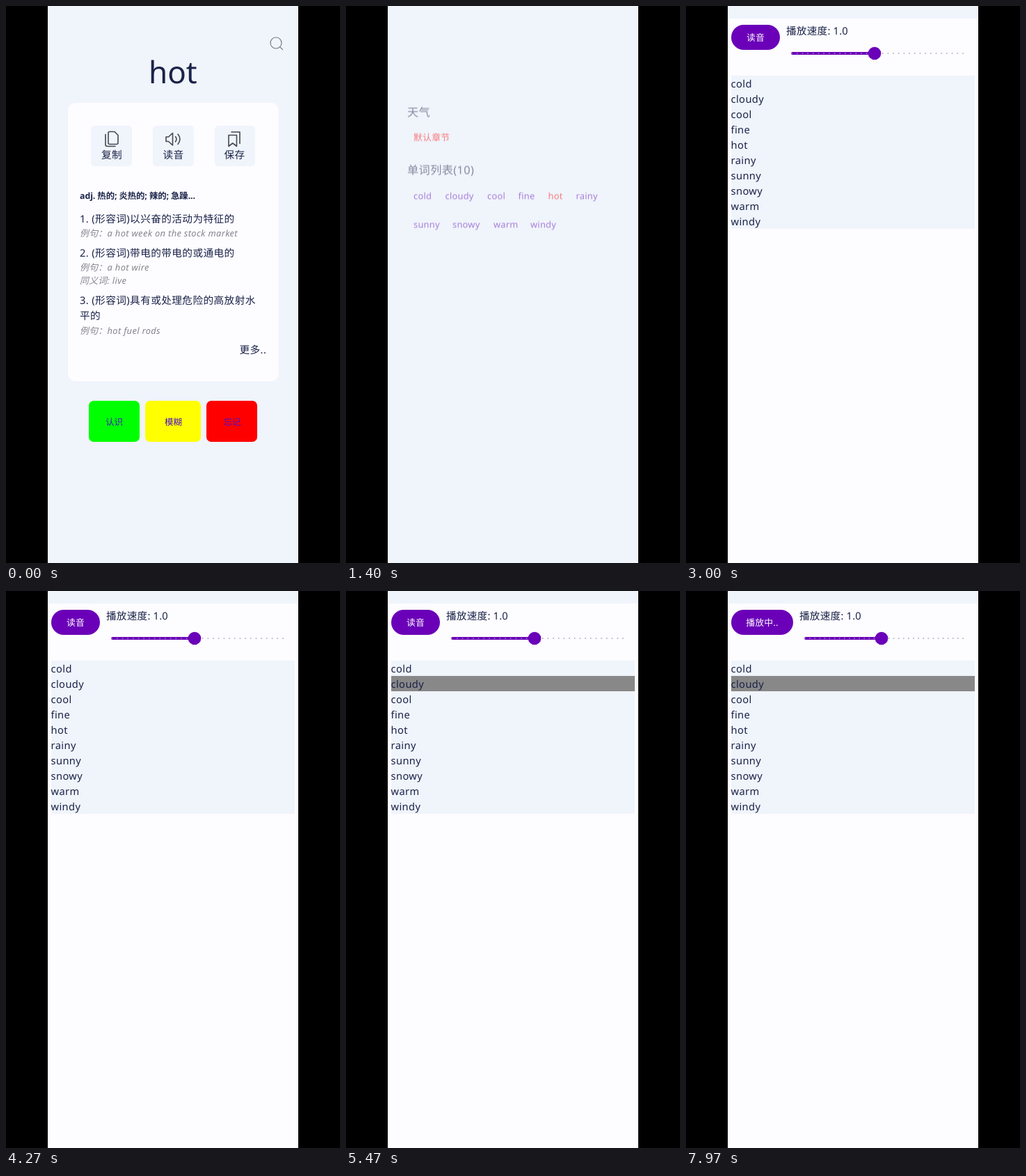
These frames come from a looping animation (480 by 800 pixels, 8000 ms). An HTML page:

```html
<!DOCTYPE html>
<html lang="zh-CN">
<head>
<meta charset="utf-8">
<title>Word cards</title>
<style>
  html, body { margin: 0; width: 100%; height: 100%; overflow: hidden; background: #000; }
  svg { display: block; width: 480px; height: 800px; }
  text {
    font: 14.67px "Noto Sans", "Noto Sans CJK SC", sans-serif;
    letter-spacing: .4px; fill: #1a2348; text-rendering: geometricPrecision;
  }
  .mid { text-anchor: middle; }
  .word { font-size: 44px; letter-spacing: 0; }
  .brief { font-size: 12.4px; font-weight: 700; letter-spacing: -.1px; }
  .note { font-size: 12.83px; font-style: italic; letter-spacing: .35px; fill: #85858c; }
  .grade { font-size: 12.5px; letter-spacing: .1px; fill: #4a10c8; text-anchor: middle; }
  .head { font-size: 16.2px; }
  .chip { font-size: 12.83px; letter-spacing: .25px; fill: #5f0ab8; }
  .red { fill: #f00; }
  .label { font-size: 12.83px; letter-spacing: .2px; fill: #fff; text-anchor: middle; }
  .speed { letter-spacing: .2px; }
  .page { fill: #f0f4fb; }
  .sheet { fill: #fdfcff; }
  .purple { fill: #6a00b8; }
  .icon { fill: none; stroke: #44484f; stroke-width: 1.6; stroke-linejoin: round; stroke-linecap: round; }
  .ticks { stroke-width: 2; stroke-linecap: round; }

  .anim { animation: 8s linear infinite; }
  .cut { animation: 8s step-end infinite; }
  #card { animation-name: card; }
  #list { animation-name: list; }
  #edge { animation-name: edge; transform-origin: 60px 413px; }
  #player { animation-name: player; }
  #row { animation-name: row; }
  #idle { animation-name: idle; }
  #busy { animation-name: busy; }
  #ripple { animation-name: ripple; }

  @keyframes card { 0%, 5% { opacity: 1; } 7%, 100% { opacity: 0; } }
  @keyframes list {
    0%, 5% { opacity: 0; transform: none; }
    7%, 10.75% { opacity: 1; transform: none; animation-timing-function: ease-in-out; }
    17.5% { opacity: .5; transform: translateY(81px); animation-timing-function: ease-out; }
    20.5%, 100% { opacity: 1; transform: none; }
  }
  @keyframes edge {
    0%, .5% { transform: scaleX(0); animation-timing-function: ease-out; }
    3.75%, 5% { transform: scaleX(4); }
    7.75% { transform: scaleX(1); }
    9.25%, 100% { transform: scaleX(0); }
  }
  @keyframes player { 0% { opacity: 0; } 31.375%, 100% { opacity: 1; } }
  @keyframes row { 0% { opacity: 0; } 57.5%, 100% { opacity: 1; } }
  @keyframes idle { 0% { opacity: 1; } 76.25%, 100% { opacity: 0; } }
  @keyframes busy { 0% { opacity: 0; } 76.25%, 100% { opacity: 1; } }
  @keyframes ripple { 0%, 76.2% { opacity: 0; } 76.25% { opacity: .18; } 81.6%, 100% { opacity: 0; } }
</style>
</head>
<body>
<svg viewBox="0 0 480 800">
  <rect width="480" height="800"/>
  <rect class="page" x="60" width="360" height="800"/>

  <g id="card" class="anim">
    <g class="icon" style="stroke:#70747c;stroke-width:1.1">
      <circle cx="388" cy="53" r="8"/><path d="M393.8 58.8 397.5 62.5"/>
    </g>
    <text class="word mid" x="239.8" y="111">hot</text>
    <rect class="sheet" x="89" y="139" width="303" height="400" rx="11"/>
    <g class="page">
      <rect x="122" y="172" width="59" height="58" rx="5"/>
      <rect x="211" y="172" width="59" height="58" rx="5"/>
      <rect x="300" y="172" width="58" height="58" rx="5"/>
    </g>
    <g class="icon">
      <path d="M149 180.500h7l5 5v11q0 2-2 2h-10q-2 0-2-2v-14q0-2 2-2ZM143 184.500v14.500q0 2.500 2.500 2.500h11.500"/>
      <path d="M230 188h3.500l6-5.500v17.500l-6-5.500h-3.500ZM243.500 187.500q3 3.700 0 7.500M247 184q6 7.200 0 14.500"/>
      <path d="M320 185.500h11.500v16l-5.700-4.500-5.800 4.500ZM324 181h12v16.500"/>
    </g>
    <text class="mid" x="152" y="218.500">复制</text>
    <text class="mid" x="240.500" y="218.500">读音</text>
    <text class="mid" x="328.500" y="218.500">保存</text>

    <text class="brief" x="106" y="277">adj. 热的; 炎热的; 辣的; 急躁...</text>
    <text x="106" y="311">1. (形容词)以兴奋的活动为特征的</text>
    <text class="note" x="106" y="331">例句：a hot week on the stock market</text>
    <text x="106" y="360">2. (形容词)带电的带电的或通电的</text>
    <text class="note" x="106" y="380">例句：a hot wire</text>
    <text class="note" x="106" y="399">同义词: live</text>
    <text x="106" y="428">3. (形容词)具有或处理危险的高放射水</text>
    <text x="106" y="450">平的</text>
    <text class="note" x="106" y="471">例句：hot fuel rods</text>
    <text x="335.500" y="499">更多..</text>

    <rect x="119" y="567" width="73" height="59" rx="7" fill="#0f0"/>
    <rect x="200" y="567" width="80" height="59" rx="7" fill="#ff0"/>
    <rect x="288" y="567" width="73" height="59" rx="7" fill="#f00"/>
    <text class="grade" x="155.500" y="601.500">认识</text>
    <text class="grade" x="240.500" y="601.500">模糊</text>
    <text class="grade" x="325" y="601.500">忘记</text>
  </g>

  <g id="list" class="anim">
    <text class="head" x="88" y="78">天气</text>
    <text class="chip red" x="97" y="113">默认章节</text>
    <text class="head" x="88" y="161">单词列表(10)</text>
    <g id="chips"></g>
  </g>

  <path id="edge" class="anim" d="M60 312C60 350 66 375 66 413S60 476 60 514Z" fill="#000" fill-opacity=".78"/>

  <g id="player" class="cut">
    <rect class="sheet" x="60" width="360" height="800"/>
    <rect class="page" x="60" width="360" height="18"/>
    <rect class="page" x="65" y="100" width="350" height="220"/>
    <rect id="row" class="cut" x="65" y="122" width="350" height="22" fill="#888"/>
    <g id="rows"></g>
    <g id="idle" class="cut"></g>
    <g id="busy" class="cut"></g>
    <rect id="ripple" class="anim" x="65" y="27" width="89" height="36" rx="18" fill="#fff"/>
  </g>
</svg>
<script>
  const $ = id => document.getElementById(id);
  const words = ['cold', 'cloudy', 'cool', 'fine', 'hot', 'rainy', 'sunny', 'snowy', 'warm', 'windy'];
  const chipX = [97, 142.5, 203, 247.5, 290.5, 330.5, 97, 153, 212, 265];

  $('chips').innerHTML = words.map((w, i) =>
    `<text class="chip ${w === 'hot' ? 'red' : ''}" x="${chipX[i]}" y="${i < 6 ? 196.5 : 237.5}">${w}</text>`).join('');
  $('rows').innerHTML = words.map((w, i) => `<text x="64.5" y="${117 + 22 * i}">${w}</text>`).join('');

  // Play button, speed caption and slider; the slider shrinks as the button widens.
  function controls(label, width, thumb) {
    const left = 82 + width, right = 398, gap = (right - left) / 32;
    const ticks = (from, to, color) =>
      `<path class="ticks" d="M${from} 68H${to}" stroke="${color}" stroke-dasharray="0 ${gap}"/>`;
    return `<rect class="purple" x="65" y="27" width="${width}" height="36" rx="18"/>
      <text class="label" x="${65 + width / 2}" y="49.5">${label}</text>
      <text class="speed" x="${74 + width}" y="40.5">播放速度: 1.0</text>
      <rect class="purple" x="${left - 1}" y="66" width="${thumb - left}" height="4" rx="2"/>
      ${ticks(left, thumb, '#a06cd0')}
      ${ticks(left + gap * 17, right + 1, '#b9b2c2')}
      <circle class="purple" cx="${thumb}" cy="68" r="9.3"/>`;
  }
  $('idle').innerHTML = controls('读音', 70, 271);
  $('busy').innerHTML = controls('播放中..', 89, 281);
</script>
</body>
</html>
```
